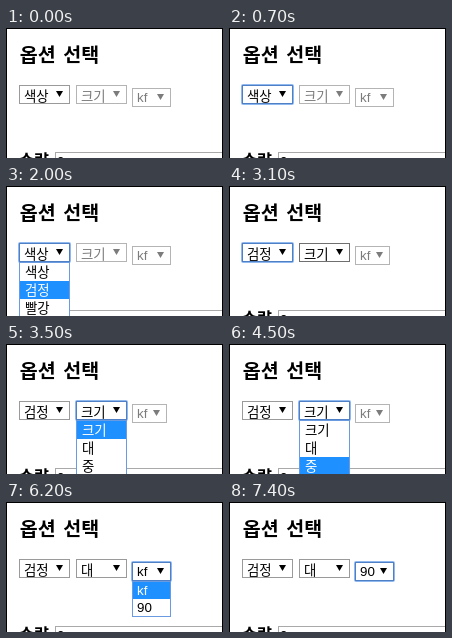
Write an HTML page that moves like this. It is 217x130 px and loops after 8000 ms.

```html
<!DOCTYPE html>
<html lang="ko">
<head>
<meta charset="utf-8">
<style>
  html, body { margin: 0; width: 100%; height: 100%; overflow: hidden; background: #fff; }
  svg { display: block; width: 217px; height: 130px; }
  text { font: 300 13.4px "Noto Sans CJK KR", "Noto Sans CJK", sans-serif; white-space: pre; }
  .latin { font: 13.33px "Liberation Sans", Arial, sans-serif; }
  .title { font-size: 19.5px; font-weight: 700; word-spacing: 2.3px; }
  .label { font-size: 16.3px; font-weight: 700; }
</style>
</head>
<body>
<svg id="stage" viewBox="0 0 217 130"></svg>
<script>
const LOOP = 8000;
const stage = document.getElementById('stage');

// Each track is a list of [start, value]; the latest start wins.
const menus = [
  {
    x: 13, y: 57, row: 18, options: ['색상', '검정', '빨강'],
    width: [[0, 51]],
    enabled: [[0, true]],
    value: [[0, 0], [2400, 1]],
    hover: [[0, false], [300, true], [2400, false]],
    focus: [[0, false], [700, true], [3400, false]],
    open: [[0, false], [800, true], [2400, false]],
    active: [[0, 0], [1300, 1], [1700, 2], [2000, 1]]
  },
  {
    x: 70, y: 57, row: 18, options: ['크기', '대', '중'],
    width: [[0, 51]],
    enabled: [[0, false], [2400, true]],
    value: [[0, 0], [5300, 1]],
    hover: [[0, false], [3100, true], [5300, false]],
    focus: [[0, false], [3400, true], [6200, false]],
    open: [[0, false], [3500, true], [5300, false]],
    active: [[0, 0], [4000, 1], [4500, 2], [4900, 1]]
  },
  {
    x: 126, y: 60, row: 17, options: ['kf', '90'], latin: true,
    width: [[0, 39], [2400, 35], [5300, 39]],
    enabled: [[0, false], [5300, true]],
    value: [[0, 0], [7400, 1]],
    hover: [[0, false], [5800, true], [6400, false]],
    focus: [[0, false], [6200, true]],
    open: [[0, false], [6200, true], [7400, false]],
    active: [[0, 0], [6700, 1]]
  }
];

function at(track, t) {
  let value = track[0][1];
  for (const [start, v] of track) if (t >= start) value = v;
  return value;
}

function rect(x, y, w, h, fill) {
  return `<rect x="${x}" y="${y}" width="${w}" height="${h}" fill="${fill}"/>`;
}

function box(x, y, w, h, stroke, fill = '#fff', r = 0) {
  return `<rect x="${x + .5}" y="${y + .5}" width="${w - 1}" height="${h - 1}" rx="${r}" fill="${fill}" stroke="${stroke}"/>`;
}

function label(x, y, s, cls = '', fill = '#000') {
  return `<text x="${x}" y="${y}" class="${cls}" fill="${fill}">${s}</text>`;
}

function drawSelect(m, t) {
  const on = at(m.enabled, t), w = at(m.width, t);
  const ink = on ? '#000' : '#7c7c7c';
  const edge = !on ? '#b4b4b4' : at(m.hover, t) ? '#6f6f6f' : '#9a9a9a';
  const focus = at(m.focus, t);
  const left = m.x + w - 14, top = m.y + 6;
  return (focus ? box(m.x - 1, m.y - 1, w + 2, 21, '#8fb8ee', '#fff', 1) : '')
    + box(m.x, m.y, w, 19, focus ? '#4f7fc4' : edge)
    + label(m.x + 5, m.y + (m.latin ? 14 : 16), m.options[at(m.value, t)], m.latin ? 'latin' : '', ink)
    + `<path d="M${left} ${top}h7l-3.5 6z" fill="${ink}"/>`;
}

function drawPopup(m, t) {
  if (!at(m.open, t)) return '';
  const w = at(m.width, t), top = m.y + 19, active = at(m.active, t);
  let out = box(m.x, top, w, m.options.length * m.row + 2, '#6a9be0');
  m.options.forEach((name, i) => {
    const y = top + 1 + i * m.row, lit = i === active;
    if (lit) out += rect(m.x + 1, y, w - 2, m.row, '#1e90ff');
    out += label(m.x + (m.latin ? 5 : 6), y + (m.latin ? 13 : 14), name, m.latin ? 'latin' : '', lit ? '#fff' : '#000');
  });
  return out;
}

function render(t) {
  stage.innerHTML = rect(0, 0, 217, 130, '#fff')
    + label(13.7, 33.5, '옵션 선택', 'title')
    + label(13, 138, '수량', 'label')
    + box(49, 124, 180, 24, '#a9a9a9')
    + label(51, 138, '0', 'latin')
    + menus.map(m => drawSelect(m, t)).join('')
    + menus.map(m => drawPopup(m, t)).join('')
    + rect(0, 0, 217, 1, '#000') + rect(0, 0, 1, 130, '#000') + rect(216, 0, 1, 130, '#000');
}

const began = performance.now();
function tick() {
  render((performance.now() - began) % LOOP);
  requestAnimationFrame(tick);
}
tick();
</script>
</body>
</html>
```
